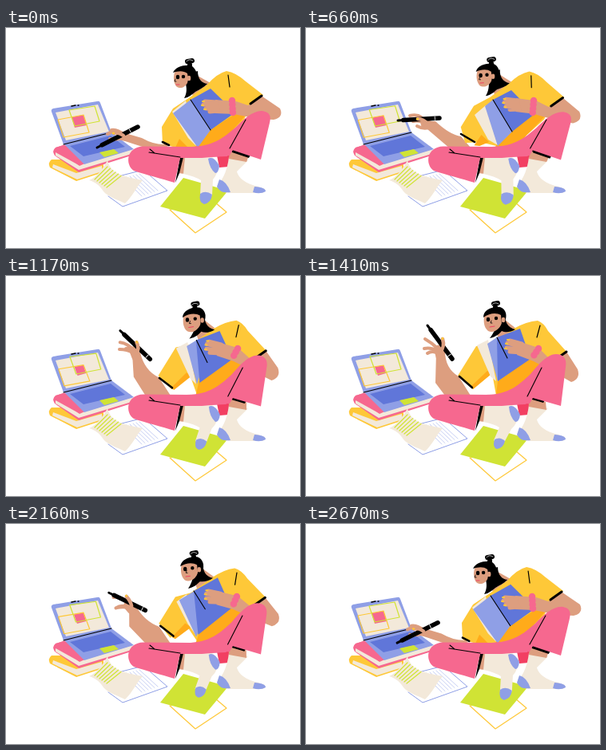
An HTML page for the animation above (2700 ms loop, 368x276 px).

```html
<!DOCTYPE html>
<html>
<head>
<meta charset="utf-8">
<style>
html, body { margin: 0; width: 100%; height: 100%; overflow: hidden; background: #fff; }
svg { display: block; width: 368px; height: 276px; }
path { stroke-linecap: round; stroke-linejoin: round; }
</style>
</head>
<body>
<svg id="stage" viewBox="0 0 368 276"></svg>
<script>
const LOOP = 2700, TIMES = [0, 660, 930, 1410, 1890, 2430];
// At each key time: how far the body leans back, the head turns, the legs swing
const LEAN = [0, .25, .65, 1, 1, .3], TURN = [0, .28, .75, 1, .96, .32], SWING = [0, -.2, .3, 1, 1, .45];
const C = { yellow: '#fec838', orange: '#ffab1a', pink: '#f6688f', red: '#f23f62', tan: '#dd9e7f',
  lilac: '#8f9fe6', blue: '#6076d9', cream: '#f3e9da', lime: '#d0e335', black: '#000', white: '#fff' };
const stage = document.getElementById('stage'), moving = [];

function add(d, attrs) {
  const el = document.createElementNS('http://www.w3.org/2000/svg', 'path');
  el.setAttribute('d', d);
  for (const name in attrs) el.setAttribute(name, attrs[name]);
  stage.append(el);
  return el;
}
const fill = (color, d) => add(d, { fill: C[color] });
const line = (color, width, d, extra) =>
  add(d, { fill: 'none', stroke: C[color], 'stroke-width': width, ...extra });
// poses: two paths blended by a weight curve, or one path per key time
function move(el, poses, weight = LEAN) {
  moving.push({ el, poses: poses.map(p => p.match(/-?[\d.]+/g).map(Number)),
    parts: poses[0].split(/-?[\d.]+/), weight });
}
const shape = (color, poses, weight) => move(fill(color, poses[0]), poses, weight);
const stroke = (color, width, poses, weight, extra) => move(line(color, width, poses[0], extra), poses, weight);

// Periodic smooth curve through the key times, flat at its extremes
function curve(v, t) {
  const n = TIMES.length;
  const time = i => TIMES[(i + n) % n] + LOOP * Math.floor(i / n), val = i => v[(i + n) % n];
  const slope = i => (val(i + 1) - val(i)) / (time(i + 1) - time(i));
  const tangent = i => {
    const a = slope(i - 1), b = slope(i);
    return a * b <= 0 ? 0 : 2 * a * b / (a + b);
  };
  let i = n - 1;
  while (TIMES[i] > t) i--;
  const h = time(i + 1) - time(i), u = (t - time(i)) / h, w = 1 - u;
  return val(i) * (1 + 2 * u) * w * w + val(i + 1) * (3 - 2 * u) * u * u +
    h * u * w * (tangent(i) * w - tangent(i + 1) * u);
}

// Books
fill('yellow', 'M57 165Q52 169 55 175L88 192L122 181L122 165Z');
fill('cream', 'M59 171L88 182L120 173L120 180L89 190L58 175Z');
fill('pink', 'M62 150Q57 154 61 160L91 181L160 159L155 148L75 146Z');
fill('cream', 'M62 156L91 172L158 152L157 158L91 178L62 160Z');
fill('pink', 'M62 150L75 146L110 165L92 173Z');

// Laptop
fill('lilac', 'M72 145L132 131L160 152L98 171Z');
fill('blue', 'M80 148L131 135L149 149L97 161Z');
fill('lime', 'M117 156L135 152L141 157L123 162Z');
fill('lilac', 'M59 101L114 92Q117 91 118 94L132 131L72 146L57 105Q56 102 59 101Z');
fill('cream', 'M62 106L115 96L129 130L75 141Z');
line('black', 1.2, 'M72 146L132 131');
line('black', 1.4, 'M82 98L87 97M90 97L91 97');
shape('pink', ['M82 112L97 109L101 122L86 125Z', 'M86 114L97 112L100 122L90 125Z']);
stroke('yellow', 1.2, ['M65 115L97 109L104 131L72 137Z', 'M66 117L97 112L105 132L73 138Z']);
stroke('lime', 1.2, ['M79 103L111 98L117 117L86 123Z', 'M80 101L113 97L119 117L88 123Z']);

// Sheets
line('lilac', 1, 'M137 187L172 178L202 204L146 224L128 211');
for (let i = 0; i < 6; i++) line('lilac', .5, `M${167 - i * 4} ${183 + i}L${190 - i * 4} ${204 + i * 1.4}`);
fill('cream', 'M127 166C131 181 142 186 171 191C164 198 158 212 149 220C139 215 128 212 122 205C117 197 111 193 104 191C114 187 122 175 127 166Z');
for (let i = 0; i < 6; i++) line('lime', 1.2, `M${111 + i * 3} ${190 + i * 2}L${127 + i * 3.4} ${174 + i * 2.3}`);
line('yellow', 1.2, 'M205 228L237 257L276 231L262 219Z');
fill('lime', 'M193 224L222 188L278 204L249 239Z');

// Writing arm
shape('tan', [
  'M146 131L170 138Q186 147 200 146L206 152L180 152L146 141Z',
  'M153 117L162 117Q180 134 194 136L206 150L180 151L152 127Z',
  'M153 101L162 101Q173 125 192 130L206 150L176 151L156 119Z',
  'M163 95L174 94Q174 116 191 126L206 150L174 150Q162 134 165 112Z',
  'M159 95L169 96Q172 117 191 126L206 150L172 150Q160 132 163 114Z',
  'M149 116L158 116Q178 133 194 135L206 150L179 151L148 126Z']);
stroke('tan', 11, ['M143 135L149 136', 'M149 120L155 122', 'M152 98L157 105', 'M166 92L168 101', 'M162 93L164 101', 'M144 118L151 121']);
stroke('tan', 4, [
  'M146 135Q138 126 127 133M146 137Q138 141 130 139M147 134Q140 127 132 128',
  'M152 121Q144 106 130 110M154 125Q146 127 139 123M152 122Q143 115 134 117',
  'M155 100Q146 86 134 92M155 103Q145 99 136 95M154 98Q150 88 146 86',
  'M166 92Q158 84 149 79M165 94Q156 89 148 91M165 97Q158 93 152 97',
  'M163 92Q155 84 144 82M162 95Q152 90 143 94M162 98Q154 93 147 99',
  'M148 119Q140 105 127 109M149 122Q141 125 134 122M148 119Q139 113 130 116']);
const PEN = ['M114 150L165 124', 'M115 116L167 113', 'M128 83L175 105', 'M152 62L183 104', 'M142 69L180 104', 'M117 114L168 116'];
stroke('black', 3, PEN);
stroke('black', 5.5, PEN, LEAN, { 'stroke-dasharray': '100 7', 'stroke-dashoffset': 100 });
stroke('white', 5, PEN, LEAN, { 'stroke-dasharray': '0 46 .8 100', style: 'stroke-linecap:butt' });
stroke('tan', 4.5, ['M147 135Q140 130 135 132', 'M153 121Q147 114 140 114', 'M156 101Q157 94 151 92',
  'M168 95Q174 89 171 79', 'M164 94Q168 88 163 78', 'M150 119Q144 113 139 113']);
stroke('yellow', 2.5, ['M134 132l1 0', 'M139 114l1 0', 'M151 91l1 1', 'M171 78l0 1', 'M163 76l0 1', 'M138 113l1 0']);

// Shirt
shape('tan', ['M228 75L240 60L256 69L236 88Z', 'M236 64L248 54L263 66L242 82Z'], TURN);
shape('yellow', [
  'M230 87L252 71Q264 57 276 54Q288 56 300 67L322 84L306 97L298 115L280 132L250 150L212 150L196 145L195 124L209 101Z',
  'M232 86L260 66Q276 57 290 56Q298 59 303 69L327 96L306 107L298 114L272 135L238 150L233 122L209 142L190 125L213 88Z']);
shape('orange', ['M212 150L217 139L228 150L220 150Z', 'M206 139L227 119L233 122L209 142Z']);
shape('orange', ['M254 129L288 107L302 107Q285 128 262 150L236 150Z', 'M240 132L279 104L304 107Q280 122 262 148L238 149Z']);
stroke('black', 2.6, ['M196 143L204 147', 'M194 133L211 143', 'M192 131L208 141', 'M192 126L208 140', 'M192 126L208 140', 'M195 132L211 142']);
stroke('black', 1.2, ['M278 59L280 74', 'M293 62L289 77']);

// Head
shape('black', [
  'M226 58L240 54C240 64 245 69 252 70C247 75 242 77 237 80C232 84 229 87 223 88C227 81 226 75 225 70Z',
  'M240 50L250 48C248 56 252 65 262 67C256 71 249 71 245 69C242 72 239 76 230 78C233 74 237 68 239 60Z'], TURN);
shape('tan', [
  'M211 56C209 62 210 69 213 73C217 77 224 75 227 69L230 56C225 50 214 50 211 56Z',
  'M223 51C222 58 223 65 228 69C234 72 242 68 245 59L247 50C240 43 227 44 223 51Z'], TURN);
shape('black', [
  'M209 56C212 49 222 46 231 47C238 50 240 58 239 67L229 69L227 57C222 53 215 54 209 56Z',
  'M222 52C222 43 232 38 243 39C251 42 252 50 249 57L245 60L244 49C239 46 230 46 222 52Z'], TURN);
stroke('tan', 4.5, ['M229 62l0 2', 'M247 54l0 2'], TURN);
stroke('black', 4.4, ['M215 61l0 1M222 61l0 0', 'M228 54l0 1M238 53l0 0'], TURN);
stroke('black', .8, ['M212 64L211 67L213 67', 'M232 56L231 59L233 59'], TURN);
stroke('red', 1, ['M213 71L217 71', 'M230 64Q233 65 236 63'.replace('Q233 65 ', 'L')], TURN);
stroke('black', 6, ['M227 42L233 41M230 46l0 1', 'M235 35L240 34M237 39l0 1'], TURN);
stroke('white', .7, ['M226 42Q229 38 234 41', 'M233 36Q236 32 241 35'], TURN);

// Book
shape('cream', ['M208 105L225 91L238 148L228 138Z', 'M211 109L225 97L240 147L228 140Z', 'M212 98L226 89L238 142L230 133Z',
  'M214 87L228 80L238 132L231 126Z', 'M217 94L228 86L238 140L230 126Z', 'M209 101L224 90L238 140L226 125Z']);
shape('lilac', ['M209 107L231 90L256 128L240 150Z', 'M224 98L234 90L258 130L240 148Z', 'M225 93L237 86L250 120L238 142Z',
  'M227 85L239 77L246 105L240 132Z', 'M224 90L239 79L247 115L238 141Z', 'M210 102L232 89L250 122L238 142Z']);
shape('blue', ['M231 90L256 76L287 106L256 128Z', 'M234 90L257 78L286 108L258 130Z', 'M236 86L266 74L286 105L247 136Z',
  'M239 77L268 66L281 104L240 132Z', 'M239 79L268 66L282 105L239 139Z', 'M231 89L260 70L282 106L244 139Z']);
stroke('black', 1.1, ['M231 90L256 128', 'M234 90L258 130', 'M237 86L252 118', 'M239 77L252 103', 'M239 79L251 102', 'M231 89L248 116']);

// Holding arm
shape('tan', [
  'M303 97L321 86L343 101Q348 112 335 115L316 114L285 108L262 107L262 90L288 92Z',
  'M306 105L326 95L340 117Q344 129 332 133L318 125L285 107L264 99L266 82L291 90Z']);
stroke('black', 3, ['M306 95L320 85', 'M309 107L326 95']);
stroke('tan', 5, ['M264 93L249 92M264 98L247 96M265 102L250 101M266 104L255 105',
  'M270 85L255 81M270 89L252 84M270 93L251 90M270 96L255 95']);
stroke('yellow', 2, ['M246 92l2 0M245 97l2 0M248 102l2 0', 'M252 80l2 0M250 85l2 0M249 91l2 0']);
stroke('pink', 8.5, ['M283 91L284 107', 'M291 91L283 103'], LEAN, { 'stroke-dasharray': '0 5' });

// Legs and feet
fill('red', 'M264 160L285 158L279 174L267 175Z');
fill('cream', 'M279 162L303 166L289 180C291 190 305 197 316 199L324 202Q326 207 318 207L280 207Q265 206 266 195Q276 185 279 162Z');
shape('tan', ['M280 152L304 160L301 168L279 164Z', 'M278 152L300 158L301 168L279 164Z'], SWING);
fill('lilac', 'M267 190Q276 192 281 206Q268 208 264 199Z');
fill('lilac', 'M311 199Q325 200 325 205Q318 209 309 206Z');
fill('tan', 'M218 162L227 162L224 183L215 182Z');
shape('cream', ['M224 162L258 162L266 170Q266 182 259 190L258 210Q252 218 243 210L244 191Q236 186 222 183Z',
  'M224 162L258 162L266 170Q266 184 257 192L249 207Q244 215 235 206L242 190Q236 186 222 183Z'], SWING);
shape('lilac', ['M253 164Q260 160 267 173Q266 182 262 182Q255 177 253 164Z', 'M254 164Q261 160 268 174Q267 183 262 183Q255 177 254 164Z']);
shape('lilac', ['M243 208Q250 203 258 209Q257 219 248 221Q241 219 243 208Z', 'M236 205Q243 201 249 207Q247 216 239 217Q233 215 236 205Z'], SWING);
shape('black', ['M280 151L306 159L304 163L283 156Z', 'M274 150L299 156L297 159L276 153Z'], SWING);
fill('black', 'M212 194L218 162L222 162L217 182Z');
fill('pink', 'M172 148.5C150 149 149 172 160 179C175 184 195 189 211 194L218 163L245 163L280 160L288 146L232 149Z');
shape('pink', [
  'M225 149C258 150 272 138 287 125C297 115 308 104 320 104C331 105 332 112 330 119L319 165L280 152L277 161L225 163Z',
  'M225 149C254 149 267 136 281 123C291 111 302 98 313 98C322 98 327 104 325 114L319 163L277 151L275 161L225 163Z'], SWING);
stroke('black', 1.1, ['M300 115L280 151', 'M295 115L277 151'], SWING);
line('black', 1.1, 'M180 152L186 157M179 156L218 162');

function draw(now) {
  const t = Math.floor(now % LOOP / 30) * 30;
  for (const { el, poses, parts, weight } of moving) {
    const s = curve(weight, t);
    const nums = poses[0].map((a, i) =>
      poses.length > 2 ? curve(poses.map(p => p[i]), t) : a + (poses[1][i] - a) * s);
    el.setAttribute('d', parts.map((p, i) => p + (i < nums.length ? nums[i].toFixed(2) : '')).join(''));
  }
}
const start = performance.now();
function tick() {
  draw(performance.now() - start);
  requestAnimationFrame(tick);
}
tick();
</script>
</body>
</html>
```
